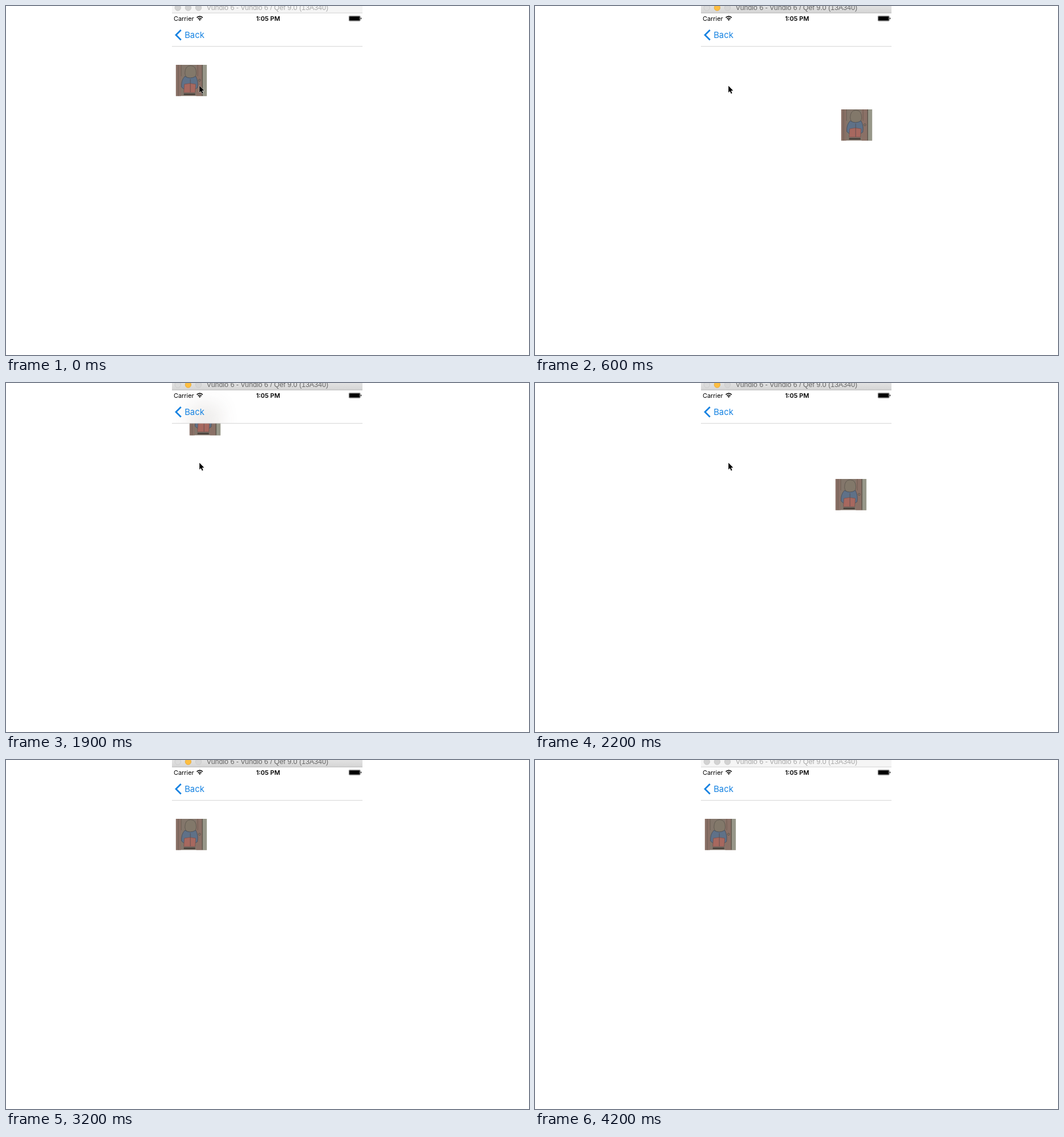
An HTML page that plays this animation: 917 by 611 pixels, repeating every 4800 ms.

```html
<!DOCTYPE html>
<html lang="en">
<head>
<meta charset="utf-8">
<title>Moving thumbnail</title>
<style>
  html, body { margin: 0; width: 100%; height: 100%; overflow: hidden; background: #fff; }
  svg { display: block; width: 917px; height: 611px; }
  text { font-family: Inter, Roboto, sans-serif; }
  .title { font-family: "Liberation Sans", Arial, sans-serif; font-size: 12.4px; text-anchor: middle; }
</style>
</head>
<body>
<svg viewBox="0 0 917 611">
  <defs>
    <linearGradient id="activeBar" x2="0" y2="1">
      <stop stop-color="#e2e2e2"/><stop offset="1" stop-color="#d5d5d5"/>
    </linearGradient>
    <filter id="soft" x="-150%" y="-150%" width="400%" height="400%">
      <feGaussianBlur stdDeviation="17"/>
    </filter>
    <clipPath id="navClip"><path d="M291 12h334v58h-334z"/></clipPath>
    <clipPath id="photoClip"><path d="M0 0h54.4v54.4h-54.4z"/></clipPath>
  </defs>

  <g id="photo" clip-path="url(#photoClip)">
    <path fill="#83766b" d="M0 0h55v55h-55z"/>
    <path fill="#8a7066" d="M0 0h9v55h-9zM36 0h10v55h-10z"/>
    <path fill="#979789" d="M47 0h8v55h-8z"/>
    <path fill="none" stroke="#665a50" stroke-width=".8" d="M4.5 0v55M9.5 0v20M38.5 0v20"/>
    <path fill="none" stroke="#4c463e" d="M46.5 0v55"/>
    <circle cx="41.7" cy="27" r="1.8" fill="#85796d" stroke="#544b44" stroke-width=".8"/>
    <path fill="#82786a" stroke="#5b554d" stroke-width=".8" d="M16 15Q16 1.5 26 1.5Q36 1.5 36 15Q35 24 26 24Q17 24 16 15Z"/>
    <path fill="#5f7188" stroke="#454c59" stroke-width=".8" d="M16 20Q25 26 35 20Q40 29 38 40L33 43H15L10 39Q9 27 16 20Z"/>
    <path fill="#a7685f" stroke="#6b4a49" stroke-width=".6" d="M15 34Q25 31 35 34L34 48.5H14Z"/>
    <path fill="none" stroke="#574a4d" stroke-width=".8" d="M25.5 25V48"/>
    <path fill="#4d4640" d="M14 50h20v3h-20z"/>
  </g>

  <g clip-path="url(#navClip)">
    <path fill="#fff" d="M291 12h334v58h-334z"/>
    <rect id="haze" width="54" height="54" fill="#5c4c40" opacity=".11" filter="url(#soft)"/>
  </g>
  <path stroke="#d3d3d3" d="M291 70.7H625"/>

  <path id="bar" d="M291 0h334v12h-334z"/>
  <path id="barEdge" d="M291 12.2H625"/>
  <g id="lights" stroke-width=".8">
    <circle cx="301.3" cy="3" r="5.2"/><circle cx="319.4" cy="3" r="5.2"/><circle cx="337.5" cy="3" r="5.2"/>
  </g>
  <text id="title" class="title" x="458.5" y="7">Vundlo 6 - Vundlo 6 / Qef 9.0 (13A340)</text>

  <text x="294" y="26" font-size="10.9">Carrier</text>
  <text x="459.5" y="26" font-size="11" font-weight="600" text-anchor="middle">1:05 PM</text>
  <g fill="none" stroke="#000" stroke-width="1.5">
    <path d="M334.5 20.4Q339.7 15.8 344.9 20.4M336.5 22.6Q339.7 19.8 342.9 22.6"/>
    <path fill="#000" stroke="none" d="M337.8 23.7Q339.7 22.3 341.6 23.7L339.7 25.8Z"/>
  </g>
  <rect x="601.2" y="17.4" width="20" height="8.8" rx="1.4" fill="#fff" stroke="#000" stroke-width=".5"/>
  <rect x="602" y="18.2" width="18.4" height="7.2" rx=".6"/>
  <path d="M622 20.2q1.3 .3 1.3 1.6t-1.3 1.6z"/>
  <path fill="none" stroke="#1683e2" stroke-width="2.8" d="M306.8 42L298 50.8L306.8 59.6"/>
  <text x="313.2" y="56.3" font-size="14.8" fill="#1683e2">Back</text>

  <path id="cursor" fill="#000" stroke="#fff" stroke-width="1" paint-order="stroke"
    d="M0 0V11.6L2.6 9.2L4.6 13.8L6.4 13L4.5 8.5H8.2Z"/>
</svg>
<script>
const LOOP = 4800, STEP = 100;
const HOME = [297.7, 103];
const LAUNCHES = [180, 1800];
const FLIGHT = 790;
// Offsets from home, one every 100 ms of flight
const PATH = [[0, 0], [24, -66], [85, -50], [162, 2], [229, 65],
              [265, 131], [248, 199], [165, 275], [50, 360]];

const $ = id => document.getElementById(id);
const set = (id, attrs) => {
  for (const k in attrs) $(id).setAttribute(k, attrs[k]);
};
const moveTo = (id, x, y) => set(id, { transform: `translate(${x} ${y})` });
const show = (id, on) => set(id, { visibility: on ? "visible" : "hidden" });

function spline(u) {
  const i = Math.floor(u), f = u - i;
  const at = n => PATH[Math.max(0, Math.min(PATH.length - 1, n))];
  const [a, b, c, d] = [i - 1, i, i + 1, i + 2].map(at);
  return [0, 1].map(k => b[k] + f / 2 * (c[k] - a[k]
    + f * (2 * a[k] - 5 * b[k] + 4 * c[k] - d[k]
    + f * (3 * (b[k] - c[k]) + d[k] - a[k]))));
}

function drawPhoto(t) {
  const start = LAUNCHES.find(s => t >= s && t < s + FLIGHT);
  const [dx, dy] = start === undefined ? [0, 0] : spline((t - start) / 100);
  const x = HOME[0] + dx, y = HOME[1] + dy;
  moveTo("photo", x, y);
  moveTo("haze", x, y);
  show("haze", y < 70);
}

function drawWindow(active) {
  set("bar", { fill: active ? "url(#activeBar)" : "#f5f5f5" });
  set("barEdge", { stroke: active ? "#b5b5b5" : "#d2d2d2" });
  set("title", { fill: active ? "#666" : "#aaa" });
  const fills = active ? ["#dcdcdc", "#fdbe41", "#d6d6d6"] : ["#d2d2d2", "#d2d2d2", "#d2d2d2"];
  const edges = active ? ["#c9c9c9", "#e2a83a", "#c9c9c9"] : ["#c4c4c4", "#c4c4c4", "#c4c4c4"];
  [...$("lights").children].forEach((c, i) => {
    c.setAttribute("fill", fills[i]);
    c.setAttribute("stroke", edges[i]);
  });
}

function drawCursor(t) {
  const passing = t >= 3800 && t < 4200;
  const p = (t - 3800) / 300;
  show("cursor", t < 2800 || passing);
  if (passing) moveTo("cursor", 364 + 14 * p, 453 + 13 * p);
  else moveTo("cursor", 339.2, 139.8);
}

function render(ms) {
  const t = Math.floor(ms % LOOP / STEP) * STEP;
  drawPhoto(t);
  drawWindow(t >= 100 && t < 3400);
  drawCursor(t);
}

const begin = performance.now();
function tick() {
  render(performance.now() - begin);
  requestAnimationFrame(tick);
}
tick();
</script>
</body>
</html>
```
